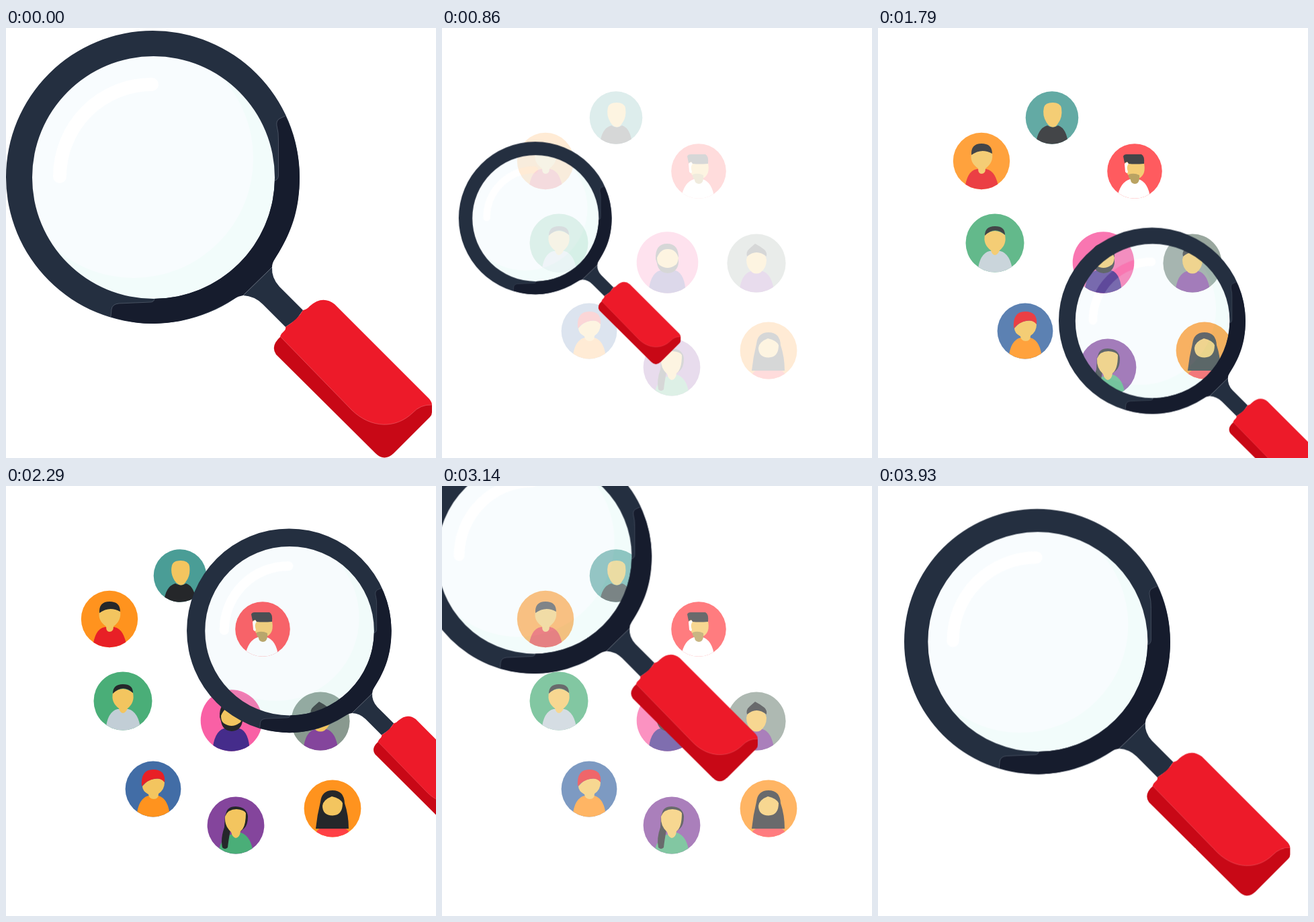
Animation of 640 by 640 pixels, one loop 4000 ms. Source, as an HTML page:

```html
<!DOCTYPE html>
<html lang="en">
<head>
<meta charset="utf-8">
<title>People search</title>
<style>
html, body { margin: 0; width: 100%; height: 100%; overflow: hidden; background: #fff; }
svg { display: block; width: 100vw; height: 100vh; }
</style>
</head>
<body>
<svg viewBox="0 0 640 640" xmlns="http://www.w3.org/2000/svg">
  <defs>
    <clipPath id="lensClip"><circle cx="219.5" cy="222.5" r="181"/></clipPath>
    <mask id="shine" maskUnits="userSpaceOnUse" x="0" y="0" width="640" height="640">
      <rect width="640" height="640" fill="#fff"/>
      <path d="M80 221A137 137 0 0 1 217 84" fill="none" stroke="#000" stroke-width="20" stroke-linecap="round"/>
    </mask>
  </defs>
  <g id="people" opacity="0"></g>
  <g id="glass">
    <g opacity=".2" mask="url(#shine)">
      <g clip-path="url(#lensClip)">
        <circle cx="219.5" cy="222.5" r="181" fill="#beeee8"/>
        <circle cx="190" cy="194" r="178" fill="#dcf0fa"/>
      </g>
    </g>
    <path fill="#242f40" fill-rule="evenodd" d="M0 222a218.5 218 0 0 1 437 0a218.5 218 0 0 1-437 0ZM39 222.5a180.5 180.5 0 0 0 361 0a180.5 180.5 0 0 0-361 0Z"/>
    <path fill="#161c2d" d="M415.500 131L407 135Q402 138 403 145Q406 156 405.500 168V220Q405 226 400 227A180.500 180.500 0 0 1 221 403Q220 408 215 408L168 410Q158 411 157 419L156 430Q188 440 221 440C272 439 310 420 339 403Q346 399 353 398L396 356Q396 350 400 344C420 312 437 279 437 222Q436 170 415.500 131Z"/>
    <path fill="none" stroke="#8b95a3" stroke-opacity=".55" stroke-width=".7" d="M415.500 131L407 135Q402 138 403 145Q406 156 405.500 168V220Q405 226 400 227M221 403Q220 408 215 408L168 410Q158 411 157 419L156 430"/>
    <path fill="#242f40" d="M353 398Q370 399 382 411L416 445L432 434L442 420L407 385Q395 372 396 356Z"/>
    <path fill="none" stroke="#8b95a3" stroke-opacity=".5" stroke-width=".7" d="M353 398L396 356"/>
    <path fill="#c80816" d="M409 459Q393 473 402 486L550 633Q563 646 577 633L631 579Q634 576 634 572V561L600 540L430 470Z"/>
    <path fill="#ed1a29" d="M408 459Q410 454 414 451Q417 448 416 445Q434 434 442 420Q448 419 452 414Q471 397 489 411L630 552Q634 557 634 561Q617 560 605 573C580 597 543 596 515 569Z"/>
    <path fill="none" stroke="#f58a90" stroke-opacity=".6" stroke-width=".7" d="M408 459L515 569C543 596 580 597 605 573Q617 560 634 561"/>
  </g>
</svg>
<script>
const INK = '#25272a', SKIN = '#f3c55f', ORANGE = '#ff931e', RED = '#ff4045',
      CRIMSON = '#e82026', GREEN = '#4aae78', PURPLE = '#84459c';

// badge: centre x, centre y, radius, colour, then [fill, path] layers
const badges = [
  [259, 133.5, 39.3, '#4a9d96', [
    [INK, 'M235 176Q236 150 252 145Q260 150 268 145Q282 150 283 176Z'],
    [SKIN, 'M247 118Q249 111 260 111Q271 111 273 119Q275 133 268 142Q265 147.500 260 147.500Q255 147 251 141Q244 130 247 118Z']]],
  [154, 198, 42.2, ORANGE, [
    [CRIMSON, 'M129 243Q131 213 147 210H161Q177 213 180 243Z'],
    [SKIN, 'M139 187Q154 176 170 187Q172 200 160 209Q160 217 154 217Q149 217 149 209Q136 200 139 187Z'],
    [INK, 'M139 189Q138 172 154 172Q170 172 170 187Q154 178 139 189Z']]],
  [382, 213, 40.8, RED, [
    ['#fff', 'M355 260Q358 230 375 225H388Q404 230 406 260Z'],
    [SKIN, 'M368 199L396 201Q399 217 390 223H376Q366 214 368 199Z'],
    ['#fff', 'M367 202Q372 198 373 202Q369 206 372 214Q371 218 368 214Z'],
    ['#af9449', 'M373 218Q381 215 389 219Q390 232 382 232Q376 231 376 226Q372 222 373 218Z'],
    [INK, 'M367 201L365 191Q366 188 370 188H392Q397 190 396 202Q382 203 373 202L371 199Z']]],
  [174, 320, 43.5, GREEN, [
    ['#c2ced6', 'M148 366Q150 336 166 332H182Q198 336 201 366Z'],
    [SKIN, 'M159 308Q174 296 189 308Q192 322 181 331Q178 338 174 338Q170 338 168 331Q156 322 159 308Z'],
    [INK, 'M159 309Q159 295 174 295Q189 295 189 308Q174 294 159 309Z']]],
  [335.5, 349, 45.8, '#f960a5', [
    ['#452c8b', 'M307 397Q309 366 324 361H348Q362 366 363 397Z'],
    [INK, 'M318 344Q317 321 335 321Q353 321 352 344V350Q350 364 336 365Q322 364 320 350Z'],
    [SKIN, 'M320 342Q325 329 336 329Q348 329 352 342Q351 351 347 353Q336 361 324 353Q320 350 320 342Z']]],
  [468, 350, 43.6, '#89998f', [
    [PURPLE, 'M442 397Q444 366 460 362H477Q492 366 495 397Z'],
    [SKIN, 'M453 345Q455 333 468 332Q481 333 483 345Q483 357 474 364Q468 367 462 364Q453 357 453 345Z'],
    [INK, 'M454 340Q452 333 458 328L466 321Q474 325 480 330Q484 334 483 340Q468 328 454 340Z']]],
  [219, 451, 41.4, '#426da6', [
    [ORANGE, 'M194 495Q196 465 212 461H227Q243 466 244 495Z'],
    [SKIN, 'M203 447Q212 436 221 436Q232 434 236 441Q236 452 227 458Q227 466 220 466Q213 466 212 459Q203 454 203 447Z'],
    [CRIMSON, 'M202 447Q200 422 219 422Q238 422 236 441Q230 434 220 436Q210 438 202 447Z']]],
  [342, 505, 42.4, PURPLE, [
    [INK, 'M327 490Q328 477 342 477Q359 478 360 492Q360 505 354 510L348 515L334 512Z'],
    [GREEN, 'M316 549Q317 527 334 519L350 516Q366 522 368 549Z'],
    [INK, 'M326 488Q327 500 334 512Q331 528 330 538Q326 542 322 538Q319 525 325 508Z'],
    [SKIN, 'M326 492Q330 481 343 481Q355 482 357 487Q357 508 349 514Q348 523 342 524Q337 523 335 515Q325 506 326 492Z']]],
  [486, 480, 42.4, ORANGE, [
    [RED, 'M458 524Q462 510 470 509H503Q511 511 514 524Z'],
    [INK, 'M461 510Q463 490 468 470Q470 453 486 453Q503 453 504 472Q510 490 510 510Z'],
    [SKIN, 'M471 476Q472 467 485 462Q498 465 501 472Q501 490 486 490.500Q471 490 471 476Z']]]
];

const people = document.getElementById('people');
people.innerHTML = badges.map(([x, y, r, fill, layers], i) => {
  const disc = `<circle cx="${x}" cy="${y}" r="${r}"`;
  const parts = layers.map(([c, d]) => `<path fill="${c}" d="${d}"/>`).join('');
  return `<clipPath id="c${i}">${disc}/></clipPath>${disc} fill="${fill}"/><g clip-path="url(#c${i})">${parts}</g>`;
}).join('');

// time, centre x, centre y, scale
const route = [
  [0, 317, 322, 1], [430, 243.8, 168.5, .5545], [570, 226, 199, .504],
  [860, 190, 335, .521], [1140, 174, 468, .556], [1210, 186, 500.6, .565],
  [1500, 290, 535, .6], [1710, 410, 520, .627], [1790, 470.6, 499.3, .636],
  [2290, 490, 285, .697], [2790, 308.8, 156.3, .7597], [2860, 282, 152, .768],
  [3500, 215.6, 265.9, .849], [3930, 326.2, 322.1, .906]
];
const LOOP = 4000, FPS = 14;
const glass = document.getElementById('glass');
const clamp = v => Math.max(0, Math.min(1, v));

function slope(i, k) {
  const d = j => (route[j + 1][k] - route[j][k]) / (route[j + 1][0] - route[j][0]);
  if (i === 0) return d(0);
  if (i === route.length - 1) return d(i - 1);
  const a = route[i][0] - route[i - 1][0], b = route[i + 1][0] - route[i][0];
  return (b * d(i - 1) + a * d(i)) / (a + b);
}

// cubic Hermite through the route
function along(t, k) {
  let i = 0;
  while (i < route.length - 2 && t >= route[i + 1][0]) i++;
  const p = route[i], q = route[i + 1], h = q[0] - p[0];
  const u = (t - p[0]) / h, v = 1 - u;
  return p[k] * v * v * (1 + 2 * u) + q[k] * u * u * (3 - 2 * u)
    + h * u * v * (slope(i, k) * v - slope(i + 1, k) * u);
}

function draw(ms) {
  const step = Math.floor((ms % LOOP + 5) * FPS / 1000) % (LOOP * FPS / 1000);
  const t = Math.round(step * 100 / FPS) * 10;
  const s = along(t, 3);
  const x = along(t, 1) - 317 * s, y = along(t, 2) - 322 * s;
  glass.setAttribute('transform', `translate(${x} ${y}) scale(${s})`);
  people.setAttribute('opacity', Math.min(clamp((t - 600) / 1385), clamp((3930 - t) / 1150)));
}

const start = performance.now();
function tick() {
  draw(performance.now() - start);
  requestAnimationFrame(tick);
}
tick();
</script>
</body>
</html>
```
